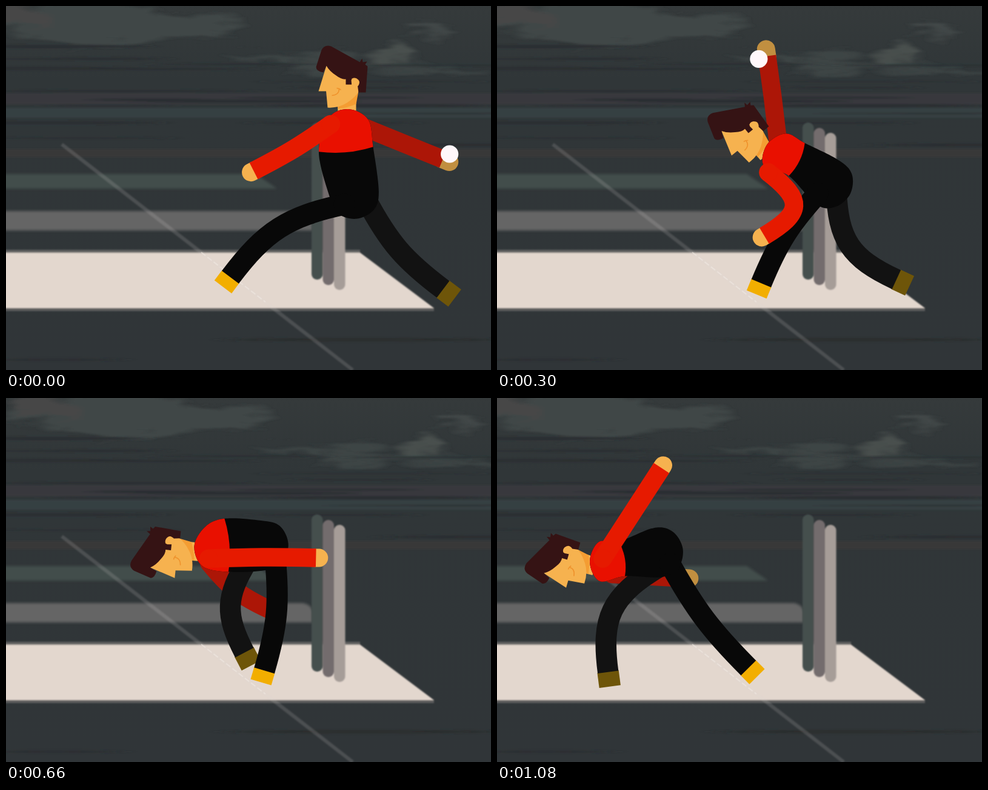
An HTML page that plays this animation: 800 px wide and 600 px high, repeating every 1.11 s.

```html
<!DOCTYPE html>
<html lang="en">
<head>
<meta charset="utf-8">
<title>Bowler</title>
<style>
  html, body { margin: 0; width: 100%; height: 100%; overflow: hidden; background: #303538; }
  svg { display: block; width: 100vw; height: 100vh; }
</style>
</head>
<body>
<svg viewBox="0 0 800 600">
  <defs>
    <linearGradient id="sky" x2="0" y2="1">
      <stop offset="0" stop-color="#353a3b"/>
      <stop offset=".2" stop-color="#303638"/>
      <stop offset="1" stop-color="#303538"/>
    </linearGradient>
    <filter id="ragged" x="-150" y="-60" width="1100" height="260" filterUnits="userSpaceOnUse">
      <feTurbulence type="fractalNoise" baseFrequency=".012 .07" numOctaves="3" seed="4" result="noise"/>
      <feGaussianBlur in="SourceGraphic" stdDeviation="7 3"/>
      <feDisplacementMap in2="noise" scale="40" xChannelSelector="R" yChannelSelector="G"/>
      <feGaussianBlur stdDeviation="2 1"/>
    </filter>
    <filter id="streak" x="-100" y="0" width="1000" height="600" filterUnits="userSpaceOnUse">
      <feGaussianBlur stdDeviation="16 1.6"/>
    </filter>
    <filter id="soft" x="-20" y="200" width="840" height="420" filterUnits="userSpaceOnUse">
      <feGaussianBlur stdDeviation="2.2"/>
    </filter>
    <filter id="edge" x="-20" y="150" width="840" height="470" filterUnits="userSpaceOnUse">
      <feGaussianBlur stdDeviation="1"/>
    </filter>
  </defs>

  <rect width="800" height="600" fill="url(#sky)"/>
  <g id="clouds"><g id="puffs" filter="url(#ragged)"></g></g>
  <g id="streaks" filter="url(#streak)">
    <rect x="-60" y="144" width="920" height="18" fill="#38393e"/>
    <rect x="-60" y="168" width="920" height="16" fill="#344043"/>
    <rect x="-60" y="236" width="920" height="13" fill="#383839"/>
  </g>

  <g filter="url(#soft)">
    <path d="M-20 277H412L447 301H-20Z" fill="#434d4b"/>
    <path d="M-20 338H490Q503 340 506 352V370H-20Z" fill="#656565"/>
  </g>
  <g filter="url(#edge)">
    <path d="M-20 404H584M-20 500.500H706" stroke="#5e5f5e" stroke-width="4.500"/>
    <path d="M-20 406.500H584L706 498H-20Z" fill="#e3d7ce"/>
    <path d="M92 228L572 600" stroke="#d8d4d2" stroke-opacity=".16" stroke-width="6"/>
  </g>
  <path d="M322 406L428 488" stroke="#f3ebe5" stroke-opacity=".5" stroke-width="2" stroke-dasharray="9 4"/>

  <g filter="url(#edge)">
    <rect x="504" y="192" width="18.500" height="259" rx="9" fill="#454f4e"/>
    <rect x="522.500" y="201" width="18.500" height="259" rx="9" fill="#736c6d"/>
    <rect x="541" y="209" width="18.500" height="259" rx="9" fill="#a69d98"/>
  </g>

  <g id="farArm"></g>
  <circle id="ball" r="14.600" fill="#fff7fa"/>
  <g id="head">
    <path d="M544 150H575V180L545 178Z" fill="#f6b24f"/>
    <path d="M579 142L575 163Q562 169 545 171V164Z" fill="#f49d33"/>
    <path d="M526 100L513 142L525.500 142L528 169Q546 170 560 161Q575 151 580 141V108Z" fill="#f6b24f"/>
    <path d="M518 74Q523 64 534 68L581 94L585 88L586 94L593 93L590 98L594 101L591 144H579L576 122L568 121V131H558V122Q551 123 542 116Q531 109 526 100L521 111Q509 109 509 102Z" fill="#351314"/>
    <path d="M567 124Q569 118 576 121Q582 125 580 130Q578 137 568 135Z" fill="#f6b24f"/>
    <path d="M535 149Q547 148 547 138M543 137Q547 137 550 140" fill="none" stroke="#ef922c" stroke-width="1.500"/>
  </g>
  <g id="farLeg"></g>
  <path id="torso" fill="#080808"/>
  <path id="shirt" fill="#e91000"/>
  <g id="nearLeg"></g>
  <g id="nearArm"></g>
</svg>

<script>
const LOOP = 1110, STEP = 30, RELEASE = 330, BALL_GONE = 435;
const $ = id => document.getElementById(id);
const clamp = x => Math.min(1, Math.max(0, x));
const rad = deg => deg * Math.PI / 180;
const bump = (t, mid, width) => Math.exp(-(((t - mid) / width) ** 2));
const shift = (p, v, k) => [p[0] + v[0] * k, p[1] + v[1] * k];
function smooth(t, from, to) {
  const u = clamp((t - from) / (to - from));
  return u * u * (3 - 2 * u);
}

function add(parent, tag, attrs) {
  const el = document.createElementNS('http://www.w3.org/2000/svg', tag);
  for (const k in attrs) el.setAttribute(k, attrs[k]);
  return parent.appendChild(el);
}

// Sky
let seed = 7;
const random = () => (seed = seed * 16807 % 2147483647) / 2147483647;
const spread = size => (random() + random() - 1) * size;
function cloud(cx, cy, w, h, count, fill) {
  for (let i = 0; i < count; i++) {
    add($('puffs'), 'ellipse', {
      cx: cx + spread(w), cy: cy + spread(h), fill,
      rx: w * (.3 + .3 * random()), ry: h * (.3 + .3 * random())
    });
  }
}
cloud(160, 25, 190, 36, 8, '#404746');
cloud(10, 18, 70, 30, 4, '#474747');
cloud(570, 97, 170, 14, 7, '#3d4445');
cloud(630, 78, 50, 18, 5, '#484f4e');
cloud(678, 33, 50, 10, 3, '#454b4b');
for (let i = 0; i < 20; i++) {
  add($('streaks'), 'ellipse', {
    cx: 800 * random(), cy: 65 + 165 * random(), rx: 80 + 140 * random(), ry: 1 + 2 * random(), fill: '#2a2f31'
  });
}
add($('streaks'), 'ellipse', { cx: 590, cy: 550, rx: 230, ry: 3, fill: '#292e2f' });
add($('streaks'), 'ellipse', { cx: 80, cy: 583, rx: 110, ry: 2, fill: '#2a2f30' });

// A limb is one arc from root to end, bowed sideways by bend
function makeLimb(id, color, width, tip) {
  const g = $(id);
  const end = add(g, 'path', { stroke: tip.color, 'stroke-width': tip.width, 'stroke-linecap': tip.cap });
  const sleeve = add(g, 'path', { fill: 'none', stroke: color, 'stroke-width': width });
  const joint = add(g, 'circle', { r: width / 2, fill: color });
  return ({ root, end: stop, bend }) => {
    const v = [stop[0] - root[0], stop[1] - root[1]], size = Math.hypot(...v);
    const side = [-v[1] / size, v[0] / size];
    const c1 = shift(shift(root, v, .4), side, bend * 4 / 3);
    const c2 = shift(shift(root, v, .6), side, bend * 4 / 3);
    const angle = Math.atan2(stop[1] - c2[1], stop[0] - c2[0]);
    const dir = [Math.cos(angle), Math.sin(angle)], point = shift(stop, dir, tip.length);
    sleeve.setAttribute('d', `M${root}C${c1} ${c2} ${stop}`);
    end.setAttribute('d', `M${shift(stop, dir, -1)}L${point}`);
    joint.setAttribute('cx', root[0]);
    joint.setAttribute('cy', root[1]);
    return { point, angle };
  };
}
const hand = (color, length) => ({ color, length, width: 30, cap: 'round' });
const foot = (color, length) => ({ color, length, width: 35.5, cap: 'butt' });
const drawFarArm = makeLimb('farArm', '#ac1607', 30, hand('#c18f40', 11.5));
const drawNearArm = makeLimb('nearArm', '#e61a00', 30.5, hand('#f6b24f', 5));
const drawFarLeg = makeLimb('farLeg', '#121212', 34.5, foot('#6e5509', 24));
const drawNearLeg = makeLimb('nearLeg', '#080808', 35, foot('#f2ae00', 20));

// The spine runs from hip to neck; "up" follows it and "back" points out of the back
function bodyAt(t) {
  const run = clamp((t - 120) / 960) ** 1.15, stride = (1 - clamp(t / 120)) ** 2;
  const hip = [
    593 - 328 * run - 19 * stride,
    309 - 66 * smooth(t, 120, 640) + 12 * smooth(t, 750, LOOP)
  ];
  const lean = rad(-95 - 65 * smooth(t, 40, 360) - 30 * smooth(t, 300, 800));
  const up = [Math.cos(lean), Math.sin(lean)], back = [-up[1], up[0]];
  const length = 139 - 26 * smooth(t, 0, 400);
  const arch = 18 * bump(t, 430, 200) - 7 * (1 - smooth(t, 0, 200));
  const from = (p, along, out) => shift(shift(p, up, along), back, out);
  return { hip, neck: shift(hip, up, length), length, arch, from };
}

// An arm keeps its length, so bending brings the hand closer
function arm(root, degrees, length, bend) {
  const reach = Math.sqrt(length ** 2 - 16 / 3 * bend ** 2), a = rad(degrees);
  return { root, end: shift(root, [Math.cos(a), Math.sin(a)], reach), bend };
}
function nearArm(t, { neck, from }) {
  const root = from(neck, -22, -28 + 34 * smooth(t, 450, 950));
  return arm(root, 155 - 212 * smooth(t, -120, 1060), 149 + 29 * smooth(t, 300, 700), -46 * bump(t, 310, 190));
}
function farArm(t, { neck, from }) {
  const root = from(neck, -33 + 42 * bump(t, 450, 180), 28 - 50 * smooth(t, 300, 680));
  const swing = 1 / (1 + Math.exp((386 - t) / 120));
  const angle = 30 - 388 * swing + 7 * (1 - smooth(t, 0, 120));
  return arm(root, angle, 138 - 22 * smooth(t, 450, 900), 14 * bump(t, 560, 150));
}

// The near foot lands at 120 ms and stays; the far foot trails and then swings through
function nearLeg(t, { hip }) {
  const lift = 1 - smooth(t, 0, 120);
  return {
    root: [hip[0] - 16 + 36 * smooth(t, 350, 650), hip[1] + 18],
    end: [444 - 30 * t / LOOP - 74 * lift, 457 - 12 * smooth(t, 300, 900) - 10 * lift],
    bend: 9 + 16 * lift - 20 * smooth(t, 300, 450) + 20 * smooth(t, 810, 1080)
  };
}
function farLeg(t, { hip }) {
  const lift = 1 - smooth(t, 0, 120), land = smooth(t, 800, 1090);
  return {
    root: [hip[0] + 20 - 45 * smooth(t, 200, 650) + 25 * land, hip[1] + 10 + 15 * smooth(t, 250, 650)],
    end: [
      hip[0] + 165 - 18 * lift - 198 * smooth(t, 100, 700) - 49 * land,
      451 + 16 * lift - 40 * smooth(t, 380, 780) + 41 * land
    ],
    bend: 13 + 27 * smooth(t, 60, 420) - 14 * smooth(t, 450, 660) + 11 * land
  };
}

function drawTorso(t, { hip, neck, length, arch, from }) {
  const half = 37 + 8 * Math.cos(2 * Math.PI * t / 720), hunch = .7 * Math.max(0, arch);
  const points = [
    from(hip, .53 * length, arch - half),
    from(neck, -11, hunch - 30), from(neck, 0, hunch + 4), from(neck, -20, hunch + 34),
    from(hip, .53 * length, arch + half),
    from(hip, 0, 41), from(hip, -30, 30), from(hip, -42, 0), from(hip, -30, -30), from(hip, 0, -41)
  ];
  const p = i => points[(i + points.length) % points.length];
  const curve = i => {
    const handle = (at, a, b, k) => shift(at, [b[0] - a[0], b[1] - a[1]], k / 6);
    return `C${handle(p(i), p(i - 1), p(i + 1), 1)} ${handle(p(i + 1), p(i), p(i + 2), -1)} ${p(i + 1)}`;
  };
  const top = `M${p(0)}` + [0, 1, 2, 3].map(curve).join('');
  $('torso').setAttribute('d', top + [4, 5, 6, 7, 8, 9].map(curve).join('') + 'Z');
  $('shirt').setAttribute('d', `${top}Q${from(hip, .53 * length - 10, arch)} ${p(0)}Z`);
}

function drawHead(t, { neck }) {
  const tilt = -84 * smooth(t, 0, 625) + 10 * smooth(t, 660, 1100);
  const x = neck[0] + 4 - 20 * bump(t, 120, 90), y = neck[1] + 2;
  $('head').setAttribute('transform', `translate(${x} ${y}) rotate(${tilt}) translate(-560 -174)`);
}

function heldBall({ point, angle }, t) {
  const a = angle - rad(110 + t / 12);
  return shift(point, [Math.cos(a), Math.sin(a)], 13 + 7 * clamp(t / 200));
}
const thrown = heldBall(drawFarArm(farArm(RELEASE, bodyAt(RELEASE))), RELEASE);

function drawBall(t, wrist) {
  const flight = [53 - thrown[0], 145 - thrown[1]];
  const place = t < RELEASE ? heldBall(wrist, t) : shift(thrown, flight, (t - RELEASE) / 90);
  $('ball').setAttribute('transform', `translate(${place})`);
  $('ball').setAttribute('visibility', t < BALL_GONE ? 'visible' : 'hidden');
}

function draw(t) {
  const body = bodyAt(t);
  drawBall(t, drawFarArm(farArm(t, body)));
  drawNearArm(nearArm(t, body));
  drawFarLeg(farLeg(t, body));
  drawNearLeg(nearLeg(t, body));
  drawTorso(t, body);
  drawHead(t, body);
  const drift = .074 * (t < 735 ? t : t - LOOP);
  $('clouds').setAttribute('transform', `translate(${drift} 0)`);
}

let origin, shown = 0;
function tick(now) {
  origin ??= now;
  const t = Math.floor((now - origin) % LOOP / STEP) * STEP;
  if (t !== shown) draw(shown = t);
  requestAnimationFrame(tick);
}
draw(0);
requestAnimationFrame(tick);
</script>
</body>
</html>
```
